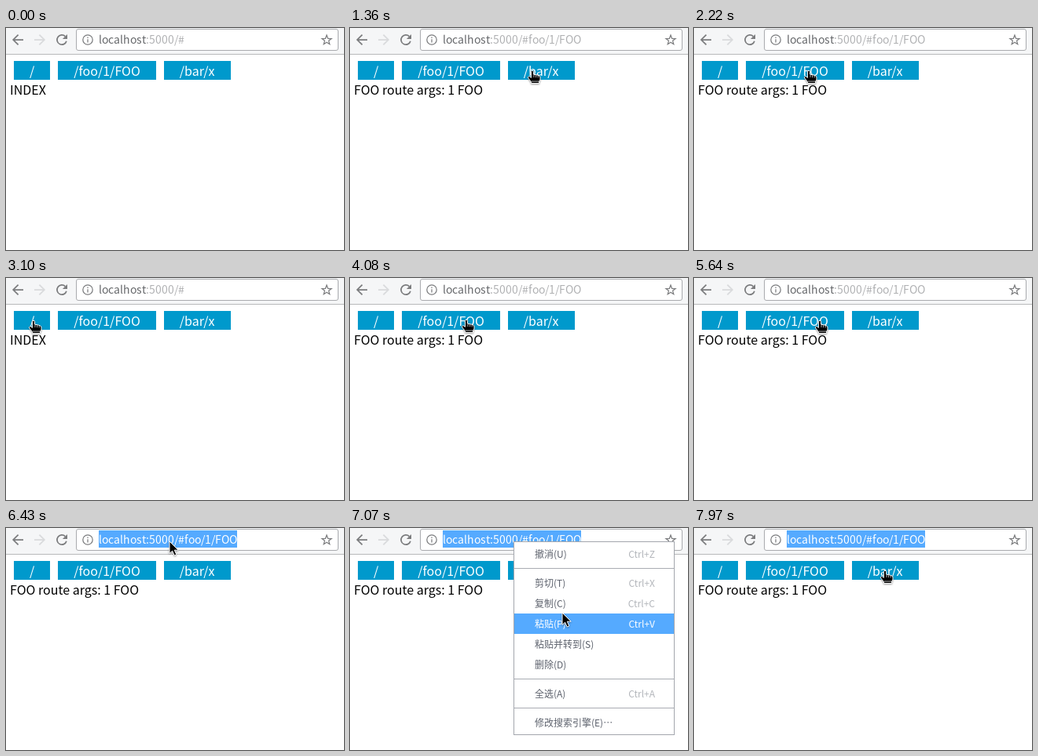
Write an HTML page that moves like this. It is 430x283 px and loops after 8 s.

```html
<!DOCTYPE html>
<html lang="zh-CN">
<head>
<meta charset="utf-8">
<title>Hash router demo</title>
<style>
  html, body { margin: 0; width: 100%; height: 100%; overflow: hidden; background: #fff; }
  svg { display: block; width: 430px; height: 283px; }
  text { font-family: "Noto Sans CJK SC", "Noto Sans", sans-serif; white-space: pre; }
  .page { font-size: 16px; }
  .link rect { fill: #09c; }
  .link text { fill: #fff; }
  #url { font-size: 14px; fill: #b0b1b3; }
  #host { fill: #66686b; }
  #url.on, #url.on #host { fill: #fff; }
  .icon { fill: none; stroke: #7b7c7e; stroke-width: 1.75; }
  .thin { stroke-width: 1.25; }
  .off { stroke: #d9dadc; }
  #menu { font-size: 12px; fill: #5c616c; }
  #menu .key { fill: #b2b5ba; text-anchor: end; }
  #menu .hot text { fill: #fff; }
  #menu .row rect { fill: none; }
  #menu .hot rect { fill: #55aaff; }
  #cursor { filter: drop-shadow(.5px 1px 1px #0006); }
  #cursor path { stroke-linejoin: round; }
</style>
</head>
<body>
<svg viewBox="0 0 430 283">
  <rect width="430" height="33" fill="#f5f6f7"/>
  <rect y="33" width="430" height="1" fill="#b8b9bb"/>
  <rect x="89.5" y="1.5" width="333" height="27" rx="2.5" fill="#fff" stroke="#a9abae"/>

  <path class="icon" d="M15.6 8.6 9.2 15l6.4 6.4M9.2 15H22"/>
  <path class="icon off" d="M42.4 8.6 48.8 15l-6.4 6.4M48.8 15H36"/>
  <path class="icon" d="M75.3 10.7A6.1 6.1 0 1 0 76.9 16.75"/>
  <path d="M78 8v6.1h-6.1z" fill="#7b7c7e"/>
  <circle class="icon thin" cx="104" cy="15" r="6.2"/>
  <path class="icon thin" d="M104 11.5v1.4M104 14.2v4.2"/>
  <path id="star" class="icon thin"/>

  <rect id="sel" x="118" y="3" height="22" fill="#55aaff"/>
  <text id="url" y="20"><tspan id="host">localhost</tspan>:5000/#<tspan id="hash"></tspan></text>

  <g id="links" class="page"></g>
  <text id="body" class="page" x="5" y="85"></text>

  <g id="menu">
    <rect x="208.5" y="17.5" width="204" height="246" fill="#fff" stroke="#a3a6ad"/>
  </g>

  <g id="cursor">
    <path id="arrow" d="M0 0V15.5L3.6 12.2 6.2 18 8.8 16.9 6.3 11.2H11.2Z" fill="#000" stroke="#fff"/>
    <g id="hand">
      <path d="M-1.6 1.5Q-1.6 .3 0 .3T1.6 1.5V5.2L4 5.6 6.5 6.1 8.8 7Q10 7.6 10 9.2V12L8.6 14V16.5H-1.6V14.4L-5.3 10Q-6 8.4-4.6 7.8T-1.6 9.4Z" fill="#000" stroke="#fff"/>
      <path d="M2 6v3M4.6 6.3v2.9M7.2 7v2.4M-1 14h9" stroke="#fff" stroke-width=".7" fill="none"/>
    </g>
    <path id="beam" d="M-3-7.5h2.3L0-7 .7-7.5H3M0-7V7M-3 7.5h2.3L0 7 .7 7.5H3" fill="none" stroke="#000" stroke-width="1.2"/>
  </g>
</svg>
<script>
const LOOP = 8000;
const $ = id => document.getElementById(id);
const show = (el, on) => { el.style.display = on ? "" : "none"; };

function add(parent, tag, attrs, text = "") {
  const el = document.createElementNS("http://www.w3.org/2000/svg", tag);
  for (const k in attrs) el.setAttribute(k, attrs[k]);
  el.textContent = text;
  return parent.appendChild(el);
}

const pen = document.createElement("canvas").getContext("2d");
function measure(text, size) {
  pen.font = `${size}px "Noto Sans CJK SC", "Noto Sans", sans-serif`;
  return pen.measureText(text).width;
}

// Links flow left to right, each as wide as its label plus padding
const PAD = 20, GAP = 10;
let left = GAP;
const links = ["/", "/foo/1/FOO", "/bar/x"].map(label => {
  const right = left + measure(label, 16) + 2 * PAD;
  const x = Math.round(left), width = Math.round(right) - x;
  const g = add($("links"), "g", { class: "link" });
  add(g, "rect", { x, y: 42, width, height: 24 });
  add(g, "text", { x: left + PAD, y: 61 }, label);
  left = right + GAP;
  return { x, width };
});

// Menu rows stack downwards; "-" is a separator
const ROW = 26, RULE = 11;
const rows = [];
let top_ = 20;
for (const item of ["撤消(U) Z", "-", "剪切(T) X", "复制(C) C", "粘贴(P) V", "粘贴并转到(S)",
  "删除(D)", "-", "全选(A) A", "-", "修改搜索引擎(E)…"]) {
  if (item === "-") {
    add($("menu"), "path", { d: `M209 ${top_ + RULE / 2}h203`, stroke: "#a9acb3" });
    top_ += RULE;
    continue;
  }
  const [label, key] = item.split(" ");
  const g = add($("menu"), "g", { class: "row" }), y = top_ + 17.5;
  add(g, "rect", { x: 209, y: top_, width: 203, height: ROW });
  add(g, "text", { x: 235, y }, label);
  if (key) add(g, "text", { x: 388, y, class: "key" }, "Ctrl+" + key);
  rows.push({ g, y: top_ });
  top_ += ROW;
}

const star = Array.from({ length: 10 }, (_, i) => {
  const a = i * Math.PI / 5, r = i % 2 ? 2.7 : 6.4;
  return `${408 + r * Math.sin(a)} ${15.5 - r * Math.cos(a)}`;
});
$("star").setAttribute("d", `M${star.join("L")}Z`);

// The address bar sets its glyphs on whole pixels
const URL_X = 118;
function setHash(hash) {
  $("hash").textContent = hash;
  let x = URL_X;
  const xs = [...$("url").textContent].map(ch => {
    const at = x;
    x += Math.round(Math.round(measure(ch, 14) * 64) / 64);
    return at;
  });
  $("url").setAttribute("x", xs.join(" "));
  $("sel").setAttribute("width", x - URL_X);
}

const INDEX = { hash: "", body: "INDEX" };
const FOO = { hash: "foo/1/FOO", body: "FOO route args: 1 FOO" };
const BAR = { hash: "bar/x", body: "BAR route args: x" };

// Each visit: when the pointer leaves, when it clicks, where, and the page opened.
// It arrives a short rest before the click.
const REST = 160;
const visits = [
  [0, 0, 258, 27, INDEX],
  [230, 1160, 126, 55, FOO],
  [1160, 1580, 248, 54, BAR],
  [1620, 2180, 149, 54, FOO],
  [2180, 2750, 35, 54, INDEX],
  [3420, 3960, 148, 53, FOO],
  [4210, 4770, 251, 50, BAR],
  [5020, 5640, 160, 54, FOO],
  [5640, 6310, 208, 17],
  [6670, 7070, 271, 111],
  [7000, 7400, 268, 99],
  [7470, 8130, 243, 54]
];
const SHOW = 230, SELECT = 6310, PRESS = 6430, OPEN = 6510, CLOSE = 7470;

function pointerAt(t) {
  const i = Math.max(1, visits.findLastIndex(v => v[0] <= t));
  const [, , x0, y0] = visits[i - 1], [leave, click, x1, y1] = visits[i];
  const u = Math.min(1, Math.max(0, (t - leave) / (click - REST - leave)));
  const e = u * u * (3 - 2 * u);
  return [x0 + (x1 - x0) * e, y0 + (y1 - y0) * e].map(Math.round);
}

function shapeAt(t, x, y) {
  if (t >= PRESS && t < CLOSE) return "arrow";
  if (y < 26 && x > 112 && x < 395) return "beam";
  const onLink = y >= 42 && y < 66 && links.some(l => x >= l.x && x < l.x + l.width);
  return onLink ? "hand" : "arrow";
}

let page;
function draw(t) {
  const now = visits.filter(v => v[4] && v[1] <= t).pop()[4];
  if (now !== page) {
    page = now;
    setHash(page.hash);
    $("body").textContent = page.body;
  }

  show($("sel"), t >= SELECT);
  $("url").classList.toggle("on", t >= SELECT);

  const open = t >= OPEN && t < CLOSE;
  show($("menu"), open);
  // The highlight trails the pointer; the first row is disabled
  const hoverY = pointerAt(t - 40)[1];
  rows.forEach(({ g, y }, i) =>
    g.classList.toggle("hot", open && i > 0 && hoverY >= y && hoverY < y + ROW));

  const [x, y] = pointerAt(t);
  const shape = shapeAt(t, x, y);
  show($("cursor"), t >= SHOW);
  $("cursor").setAttribute("transform", `translate(${x} ${y})`);
  for (const id of ["arrow", "hand", "beam"]) show($(id), id === shape);
}

const start = performance.now();
function tick() {
  draw((performance.now() - start) % LOOP);
  requestAnimationFrame(tick);
}
tick();
</script>
</body>
</html>
```
